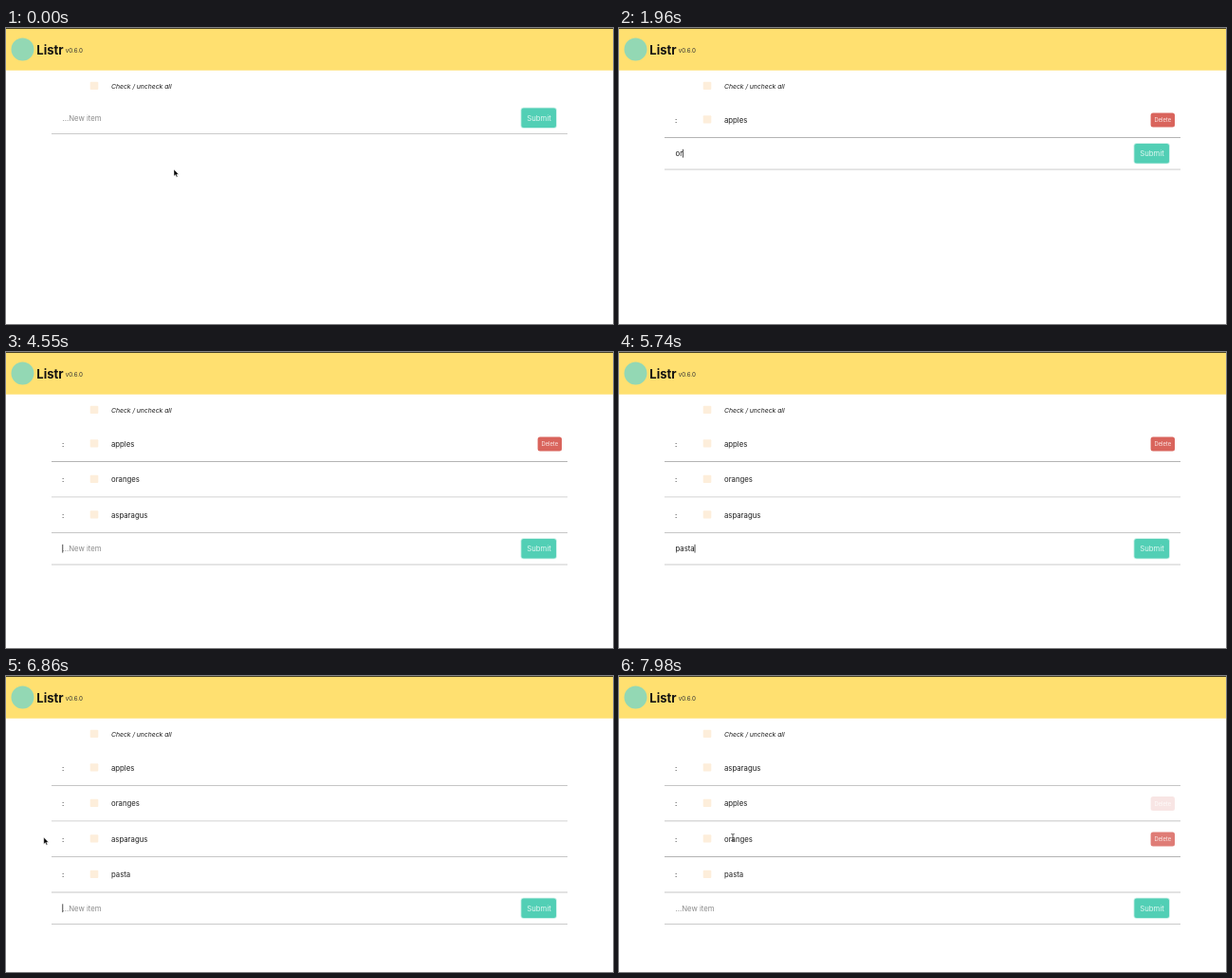
An HTML page that plays this animation: 640x312 px, repeating every 8000 ms.

```html
<!DOCTYPE html>
<html lang="en">
<head>
<meta charset="utf-8">
<title>Listr</title>
<style>
  html, body { margin: 0; width: 100%; height: 100%; overflow: hidden; background: #fff; }
  svg { display: block; width: 100vw; height: 100vh; }
  text { font: 7.75px Inter, Roboto, sans-serif; fill: #1c1c1c; white-space: pre; }
  .title { font-size: 13px; font-weight: 700; fill: #111; }
  .version { font-size: 6.2px; fill: #333; }
  .all { font-size: 6.8px; font-style: italic; }
  .box { fill: #fdeedb; }
  .line { fill: #c6c6c6; }
  .hint { fill: #8a8a8a; }
  .submit { fill: #e2f8f2; }
  .delete text { font-size: 5.8px; fill: #fbe9e7; }
</style>
</head>
<body>
<svg viewBox="0 0 640 312" xmlns="http://www.w3.org/2000/svg">
  <rect width="640" height="312" fill="#fff"/>
  <rect width="640" height="44.7" fill="#ffe070"/>
  <rect width="640" height="1" fill="#4a4326"/>
  <circle cx="17.5" cy="22.5" r="12" fill="#93d8b4"/>
  <text class="title" x="32.3" y="28">Listr</text>
  <text class="version" x="62.8" y="25.5">v0.6.0</text>
  <rect class="box" x="88.7" y="56.8" width="8.6" height="8.3" rx="1"/>
  <text class="all" x="111" y="64.3">Check / uncheck all</text>

  <g id="form">
    <text id="entry" x="59.5" y="97.7"></text>
    <rect id="caret" y="90.3" width=".8" height="8.8" fill="#222"/>
    <rect x="542.6" y="83.8" width="38.2" height="22" rx="3" fill="#52cfb5" opacity=".35"/>
    <rect x="543.4" y="84.6" width="36.6" height="20.4" rx="2.5" fill="#52cfb5"/>
    <text class="submit" x="549.3" y="97.8">Submit</text>
    <rect class="line" x="48" y="111.1" width="544" height=".9"/>
  </g>
  <g id="rows"></g>

  <g id="pointer">
    <circle id="press" r="14.6" fill="none" stroke="#000" stroke-width="1.6"/>
    <path id="arrow" d="M0 0V7.2L1.7 5.7 2.8 8.3 4 7.8 2.9 5.3H5.1Z"
          fill="#000" stroke="#fff" stroke-width=".5"/>
    <path id="beam" d="M-1.7-3.6Q0-3.6 0-2.6Q0-3.6 1.7-3.6M0-2.6V2.6M-1.7 3.6Q0 3.6 0 2.6Q0 3.6 1.7 3.6"
          fill="none" stroke="#333" stroke-width=".8"/>
    <path id="hand" d="M-2.8.4C-3.6-1-2.7-2-1.8-1.6C-1.5-2.7-.2-2.7.1-2C.7-2.8 1.8-2.4 1.9-1.6C2.9-1.9 3.3-1 3.1 0C2.9 1.8 2.3 2.2 2.1 3.2H-1.3C-1.5 2-2.3 1.4-2.8.4ZM-1.8-1.6V.2M.1-2V-.2M1.9-1.6V-.1"
          fill="#fff" stroke="#333" stroke-width=".7"/>
  </g>
</svg>
<script>
const LOOP = 8000, PITCH = 37.5;
const GRAB = 7130, RELEASE = 7650, FADE = 240;

// name, one time per key press, submit time, hover spans
const items = [
  { name: 'apples', keys: [980, 1120, 1260, 1400, 1470, 1610], at: 1680,
    hover: [[1690, 6300], [7460, 7600], [7730, 7780]] },
  { name: 'oranges', keys: [1820, 1890, 2030, 2170, 2240, 2730, 2730], at: 2800,
    hover: [[6310, 6520], [7780, 9000]] },
  { name: 'asparagus', keys: [3150, 3500, 3640, 3710, 3850, 3990, 4130, 4270, 4340], at: 4480,
    hover: [[6960, 7270], [7660, 7730]] },
  { name: 'pasta', keys: [4830, 5110, 5250, 5390, 5600], at: 5810, hover: [] }
];

// time, x, y
const path = [
  [70, 177, 149], [560, 88, 95], [6020, 88, 95], [6860, 39.8, 170],
  [7060, 58.5, 166], [GRAB, 58.5, 166], [RELEASE, 55.9, 94],
  [7660, 55.9, 94], [7900, 120, 170]
];

const $ = id => document.getElementById(id);
const clamp = v => Math.max(0, Math.min(1, v));
const ramp = (t, from, span) => clamp((t - from) / span);
const smooth = u => u * u * (3 - 2 * u);
const ease = (t, from, span) => smooth(ramp(t, from, span));
const show = (el, on) => el.setAttribute('visibility', on ? 'visible' : 'hidden');
const move = (el, x, y) => el.setAttribute('transform', `translate(${x} ${y})`);

$('rows').innerHTML = items.map(item => `<g>
  <rect x="48" width="544" y="78.5" height="37.5" fill="#fff"/>
  <text x="59" y="99.8">:</text>
  <rect class="box" x="88.7" y="92.3" width="8.6" height="8.3" rx="1"/>
  <text x="111" y="99.9">${item.name}</text>
  <g class="delete">
    <rect x="560.6" y="89.6" width="25.4" height="15" rx="2.5" fill="#d9645c"/>
    <text x="564.5" y="99.2">Delete</text>
  </g>
  <rect class="line" x="48" y="115" width="544" height="1"/>
</g>`).join('');

items.forEach((item, i) => {
  item.el = $('rows').children[i];
  item.del = item.el.querySelector('.delete');
  item.line = item.el.querySelector('.line');
});
const dragged = items[2];
$('rows').append(dragged.el);

function pointerAt(t) {
  let a = path[0];
  for (const b of path) {
    if (t < b[0]) {
      const u = ease(t, a[0], b[0] - a[0]);
      return [a[1] + (b[1] - a[1]) * u, a[2] + (b[2] - a[2]) * u];
    }
    a = b;
  }
  return [a[1], a[2]];
}

function pointerKind(t) {
  if (t < 440) return 'arrow';
  if (t < 980) return 'beam';
  if (t < 6020) return '';
  if (t < 6990) return 'arrow';
  if (t < 7710) return 'hand';
  return t < 7800 ? 'arrow' : 'beam';
}

function rowOffset(i, t) {
  if (i === 0) return [0, PITCH * ease(t, 7480, 200)];
  if (i === 1) return [0, PITCH * (1 + ease(t, 7340, 200))];
  if (i === 3) return [0, PITCH * 3];
  if (t < GRAB) return [0, PITCH * 2];
  const [x, y] = pointerAt(Math.min(t, RELEASE));
  const left = 1 - ease(t, RELEASE, 110);
  return [(x - 58.5) * left, (PITCH * 2 + y - 166) * left];
}

function drawRows(t) {
  items.forEach((item, i) => {
    show(item.el, t >= item.at);
    move(item.el, ...rowOffset(i, t));
    const alpha = item.hover.reduce((sum, [on, off]) =>
      sum + Math.max(0, ramp(t, on, FADE) - ramp(t, off, FADE)), 0);
    item.del.setAttribute('opacity', clamp(alpha));
    item.line.style.fill = alpha > 0.1 ? '#b4b4b4' : '';
  });
}

function drawForm(t) {
  const count = items.filter(item => t >= item.at).length;
  const next = items[count];
  const typed = next ? next.name.slice(0, next.keys.filter(k => t >= k).length) : '';
  const entry = $('entry');
  entry.textContent = typed || '...New item';
  entry.setAttribute('class', typed ? '' : 'hint');
  $('caret').setAttribute('x', 59.4 + (typed ? entry.getComputedTextLength() : 0));
  show($('caret'), t > 420 && (t < 5980 || (t - 480) % 1000 < 500));
  move($('form'), 0, PITCH * count);
}

function drawPointer(t) {
  const kind = pointerKind(t);
  move($('pointer'), ...pointerAt(t));
  for (const id of ['arrow', 'beam', 'hand']) show($(id), id === kind);
  show($('press'), t >= GRAB - 30 && t < RELEASE);
}

function draw(t) {
  drawRows(t);
  drawForm(t);
  drawPointer(t);
}

const start = performance.now();
function tick() {
  draw((performance.now() - start) % LOOP);
  requestAnimationFrame(tick);
}
tick();
</script>
</body>
</html>
```
